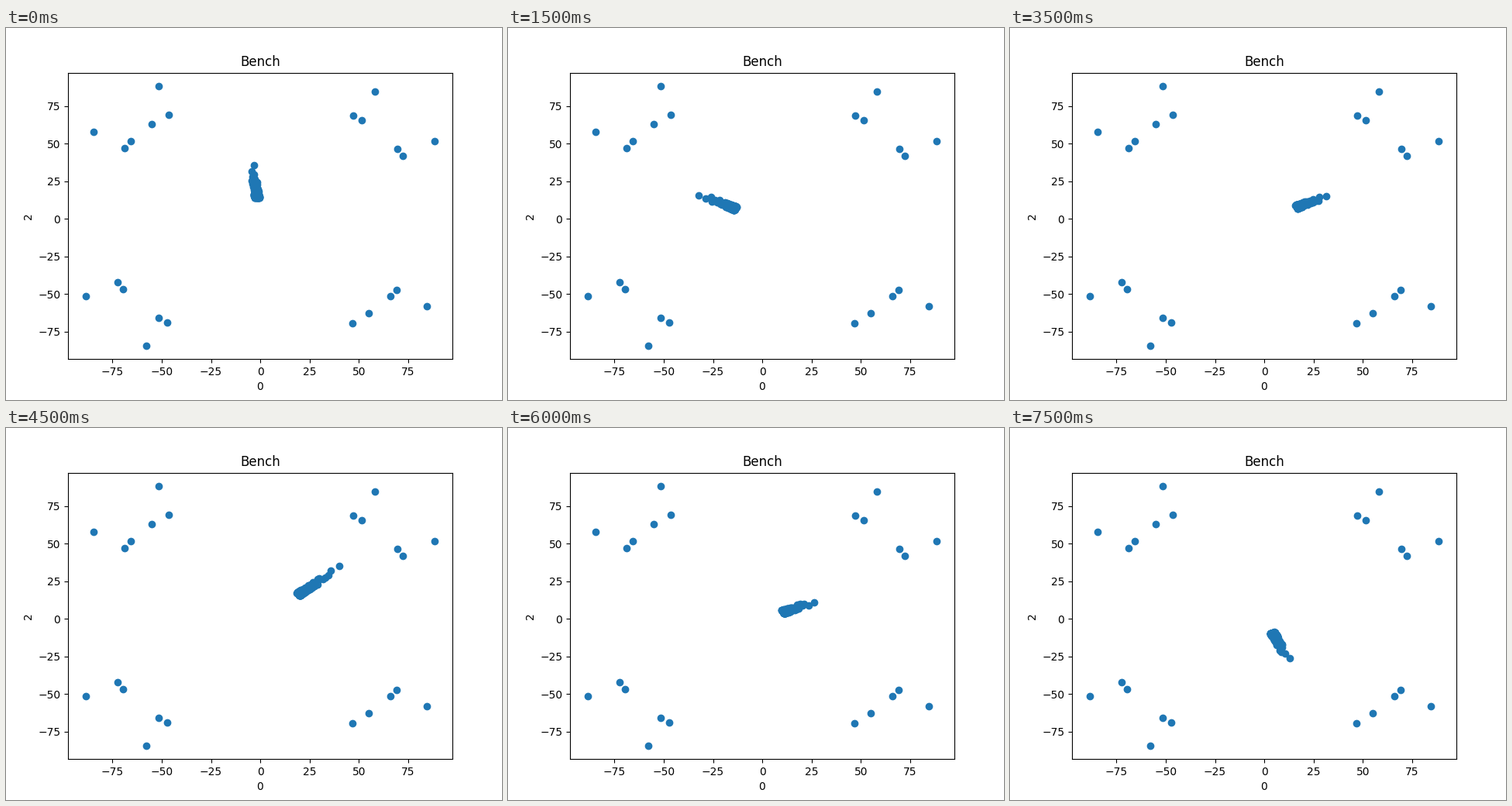
A matplotlib script for the animation above (8 s loop, 640 by 480 pixels).

```python
import matplotlib.pyplot as plt
import numpy as np
from matplotlib.animation import FuncAnimation

INTERVAL = 500
SWARM = 110
HALF_WIDTH = 1.25

# one swarm per step: bearing in degrees, nearest and farthest distance from the centre
SWARMS = [
    (97, 14.2, 36), (117.5, 20, 47.7), (-64, 13.5, 31.4), (153, 15.3, 35.6),
    (-41.7, 24, 54.8), (147, 18.5, 35.3), (210.6, 16.8, 38.3), (26, 18.2, 34.7),
    (233.4, 10.5, 23.2), (40.5, 25.3, 53.2), (100, 11, 27.2), (19.2, 9.5, 24.6),
    (24, 11.4, 28.5), (-66.3, 14.5, 37.1), (128.4, 15.5, 34.8), (-66, 10.1, 29.1),
]


def polar(radius, degrees):
    angle = np.radians(degrees)
    return np.stack([radius * np.cos(angle), radius * np.sin(angle)], axis=-1)


def corners():
    """Two rings of evenly spaced slots, repeated in each quadrant."""
    points = []
    for quadrant in range(4):
        inner = (1, 3, 6, 7) if quadrant % 2 else (0, 1, 6, 7)
        outer = (7,) if quadrant == 3 else (0, 7)
        for radius, slots in ((83.6, inner), (102.45, outer)):
            points.append(polar(radius, 90 * quadrant + 30.25 + 3.62 * np.array(slots)))
    return np.vstack(points)


def swarm(step):
    """Points along a ray, packed at the near end and thinning outwards."""
    bearing, near, far = SWARMS[step]
    rng = np.random.default_rng(step)
    rank = np.arange(SWARM)
    t = (-np.log(1 - rank / SWARM) / np.log(SWARM)) ** 1.3
    across = HALF_WIDTH * np.sin(rng.uniform(0, 2 * np.pi, SWARM))
    along = near + (far - near) * t
    return along[:, None] * polar(1, bearing) + across[:, None] * polar(1, bearing + 90)


CORNERS = corners()

fig, ax = plt.subplots(figsize=(6.4, 4.8), dpi=100)
dots = ax.scatter(*CORNERS.T, color="#1f77b4")
ax.set(title="Bench", xlabel="0", ylabel="2", xlim=(-97.48, 97.36), ylim=(-93.26, 97.3))


def update(step):
    dots.set_offsets(np.vstack([CORNERS, swarm(step)]))
    return (dots,)


anim = FuncAnimation(fig, update, frames=len(SWARMS), interval=INTERVAL,
                     init_func=lambda: update(0), repeat=True, repeat_delay=0)
plt.show()
```
